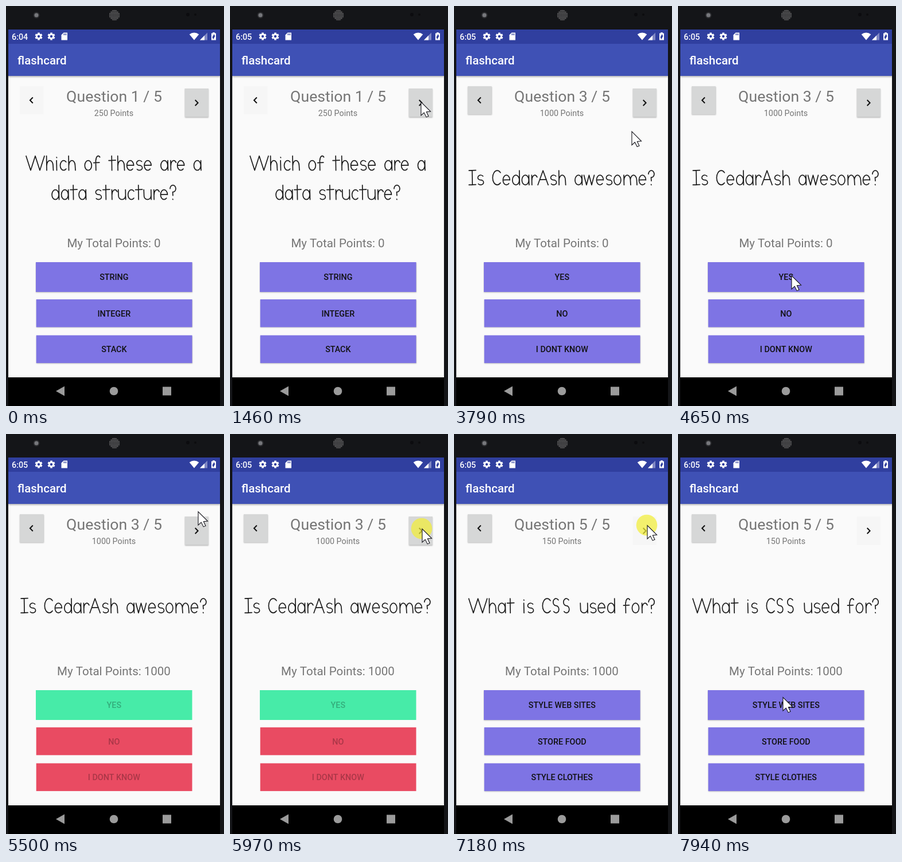
An HTML page with a canvas that plays this animation: 380x698 px, repeating every 8 s.

```html
<!DOCTYPE html>
<html lang="en">
<head>
<meta charset="utf-8">
<title>flashcard</title>
<style>
html, body { margin: 0; width: 100%; height: 100%; overflow: hidden; background: #141518; }
canvas { display: block; width: 380px; height: 698px; }
</style>
</head>
<body>
<canvas id="stage" role="img"></canvas>
<script>
const W = 380, H = 698, LOOP = 8000, MID = 188;
const canvas = document.getElementById('stage');
const c = canvas.getContext('2d');
const scale = Math.max(1, window.devicePixelRatio || 1);
canvas.width = W * scale;
canvas.height = H * scale;

const VIOLET = '#7e74e4', GREEN = '#47eba8', RED = '#e94b62';
const GREY = '#d6d7d7', PALE = '#f6f6f6', MUTED = '#757575', NAVY = '#303f9f';

// Mouse button down and up; the app reacts a moment after each release.
const presses = [[1310, 1460], [2470, 2630], [4570, 4650], [5970, 6050], [6380, 6460], [6910, 7000], [7180, 7240]];
const RIPPLE = 70, REACT = 150, SETTLE = 310, CLOCK_AT = 990;
const release = i => presses[i][1];
const answerAt = release(2) + REACT;

const cards = [
  { points: 250, lines: ['Which of these are a', 'data structure?'],
    answers: ['STRING', 'INTEGER', 'STACK'] },
  { press: 0, points: 100, lines: ['What is the main', 'language to build', 'Android applications?'],
    answers: ['JAVA', 'JAVASCRIPT', 'KOTLIN'] },
  { press: 1, points: 1000, lines: ['Is CedarAsh awesome?'],
    answers: ['YES', 'NO', 'I DONT KNOW'] },
  { press: 3, points: 500, lines: ['What is the main lan-', 'guage to build modern', 'web applications?'],
    answers: ['JAVA', 'JAVASCRIPT', 'PHP'] },
  { press: 4, points: 150, lines: ['What is CSS used for?'],
    answers: ['STYLE WEB SITES', 'STORE FOOD', 'STYLE CLOTHES'] }
];
const flipAt = card => 'press' in card ? release(card.press) + REACT : 0;

// Handwriting: every letter is built from a few pen strokes above the baseline.
const X = 17, T = 25;
const stem = (x, top = X, foot = 0) => p => { p.moveTo(x - .4, -top); p.lineTo(x, -foot); };
const bar = (y, from, to) => p => { p.moveTo(from, -y); p.lineTo(to, -y - .6); };
const dot = (x, y) => stem(x, y + .8, y);
const arc = (x, y, rx, ry, from, to, back = false) => p => {
  const a = from * Math.PI, b = to * Math.PI;
  p.moveTo(x + rx * Math.cos(a), -y + ry * Math.sin(a));
  p.ellipse(x, -y, rx, ry, 0, a, b, back);
};
const open = (h, w, from) => arc(w / 2 + 2, h / 2, w / 2, h / 2, from, .25, true);
const arch = x => p => {
  arc(x + 5.5, X / 2, 5.5, X / 2, 1, 2)(p);
  p.lineTo(x + 11.5, 0);
};
const snake = h => p => {
  arc(7.5, h * .75, 5, h / 4, 1.8, .5, true)(p);
  arc(7.5, h * .25, 5, h / 4, 1.5, .8)(p);
};
const zigzag = (h, w, n, low = 0) => p => {
  for (let i = 0; i <= n; i++) p.lineTo(1 + w * i / n, (i + low) % 2 ? 0 : -h);
};
const oval = arc(8, X / 2, 6, X / 2, 0, 2);

const letters = {
  a: [oval, stem(14.5)],
  b: [stem(2.5, T), oval],
  c: [open(X, 12, 1.75)],
  d: [oval, stem(14.5, T)],
  e: [open(X, 12, 0), bar(X / 2, 2, 14)],
  f: [arc(9, 18, 4, 7, 1, 1.75), stem(5, 18), bar(13, 1, 11)],
  g: [oval, stem(14), arc(8, 0, 6, 9, 0, .75)],
  h: [stem(3, T), arch(3)],
  i: [stem(4), dot(4, 22)],
  l: [stem(4, T)],
  m: [stem(3), arch(3), arch(14)],
  n: [stem(3), arch(3)],
  o: [oval],
  p: [stem(2.5, X, -9), oval],
  r: [stem(3), arc(8, X / 2, 5, X / 2, 1, 1.8)],
  s: [snake(X)],
  t: [stem(6.5, T), bar(X, 1, 13)],
  u: [stem(2, X, 6), arc(8, 6, 6, 6, 1, 0, true), stem(14.5)],
  w: [zigzag(X, 18, 4)],
  W: [zigzag(T, 32, 4)],
  A: [zigzag(T, 18, 2, 1), bar(9, 5, 16)],
  I: [stem(7, T), bar(T, 1, 13), bar(0, 1, 13)],
  C: [open(T, 16, 1.75)],
  S: [snake(T)],
  '?': [arc(7, 19, 5, 6, 1, .5), stem(7, 13, 7), dot(7, 0)],
  '-': [bar(8, 2, 11)],
  ' ': []
};
const advances = { il: 8, 'r ': 12.3, 'cstf?-I': 14, CS: 18, Aw: 21, m: 27, W: 34 };

const pen = {};
for (const ch in letters) {
  const path = new Path2D();
  letters[ch].forEach(stroke => stroke(path));
  const group = Object.keys(advances).find(set => set.includes(ch));
  pen[ch] = { path, advance: advances[group] || 16.5 };
}

function handwrite(line, y) {
  const width = [...line].reduce((sum, ch) => sum + pen[ch].advance, 0);
  c.save();
  c.translate(MID - width / 2, y);
  c.strokeStyle = '#1c1c1c';
  c.lineWidth = 1.7;
  c.lineCap = c.lineJoin = 'round';
  for (const ch of line) {
    c.stroke(pen[ch].path);
    c.translate(pen[ch].advance, 0);
  }
  c.restore();
}

function box(x, y, w, h, color) {
  c.fillStyle = color;
  c.fillRect(x, y, w, h);
}

function disc(x, y, r, color) {
  c.fillStyle = color;
  c.beginPath();
  c.arc(x, y, r, 0, Math.PI * 2);
  c.fill();
}

function shape(points, color, outline) {
  c.beginPath();
  points.forEach(([x, y]) => c.lineTo(x, y));
  c.closePath();
  c.fillStyle = color;
  c.fill();
  if (outline) {
    c.strokeStyle = outline;
    c.lineWidth = 1.1;
    c.stroke();
  }
}

function text(str, x, y, size, color, weight = 400, align = 'center') {
  c.font = `${weight} ${size}px Roboto, sans-serif`;
  c.textAlign = align;
  c.fillStyle = color;
  c.fillText(str, x, y);
}

function raised(x, y, w, h, color, lift) {
  c.save();
  if (lift) {
    c.shadowColor = 'rgba(0,0,0,.26)';
    c.shadowBlur = (lift + 1) * scale;
    c.shadowOffsetY = lift * scale;
  }
  box(x, y, w, h, color);
  c.restore();
}

function gear(x, y) {
  c.save();
  c.translate(x, y);
  for (let i = 0; i < 6; i++) {
    c.rotate(Math.PI / 3);
    box(-1.8, -6.5, 3.6, 4, '#fff');
  }
  disc(0, 0, 4.9, '#fff');
  disc(0, 0, 2.2, NAVY);
  c.restore();
}

function phone() {
  box(0, 0, W, H, '#141518');
  disc(53, 16, 5.5, '#2c2d30');
  disc(53, 16, 3.5, '#77787c');
  disc(189, 16, 9.5, '#29292b');
  for (let i = -3; i <= 3; i++) {
    for (let j = -3; j <= 3; j++) {
      if (i * i + j * j < 11) disc(189 + i * 2.6, 16 + j * 2.6, .85, '#77777a');
    }
  }
  disc(317, 15, 3, '#0c0c0f');
  disc(330, 15, 2, '#0c0c0f');
}

function statusBar(t) {
  box(4, 41, 369, 25, NAVY);
  text(t < CLOCK_AT ? '6:04' : '6:05', 10, 58.5, 14.35, '#fff', 500, 'left');
  gear(57, 53);
  gear(79, 53);
  shape([[100.5, 46.5], [107, 46.5], [107, 59.5], [96.5, 59.5], [96.5, 50.5]], '#fff');
  for (let i = 0; i < 3; i++) box(100.4 + i * 2, 48, 1, 3, NAVY);

  c.fillStyle = '#fff';
  c.beginPath();
  c.moveTo(328, 59.5);
  c.arc(328, 59.5, 13, -Math.PI * .72, -Math.PI * .28);
  c.fill();

  const wedge = (size, color) => shape([[338, 59.5], [338 + size, 59.5 - size], [338 + size, 59.5]], color);
  wedge(13, '#8088c4');
  wedge(8, '#fff');
  box(358, 47.5, 8, 12, '#fff');
  box(360.3, 46, 3.4, 2, '#fff');
  shape([[362.8, 49], [359.6, 54.3], [361.2, 58.2], [364.4, 52.8]], NAVY);
}

function navBar() {
  box(4, 648, 369, H - 648, '#000');
  shape([[87, 672], [102, 663.5], [102, 680.5]], '#9b9b9b');
  disc(188, 672, 7.3, '#9b9b9b');
  box(273, 664.5, 15, 15, '#9b9b9b');
}

function chevron(x, y, dir) {
  c.strokeStyle = '#111';
  c.lineWidth = 2;
  c.beginPath();
  c.moveTo(x - 2.3 * dir, y - 5);
  c.lineTo(x + 2.6 * dir, y);
  c.lineTo(x - 2.3 * dir, y + 5);
  c.stroke();
}

function arrows(t, index) {
  raised(24, 140, 41.5, 49, index ? GREY : PALE, index ? 1 : 0);
  chevron(44.5, 164.5, -1);

  const last = index === cards.length - 1;
  const age = t - Math.max(...cards.slice(1).map(card => release(card.press)).filter(up => up <= t));
  const rippling = !last && age >= RIPPLE && age < SETTLE;
  raised(311.5, 144, 41.5, 49.5, last ? PALE : GREY, last ? 0 : rippling ? 2 : 1);
  if (rippling) {
    c.save();
    c.beginPath();
    c.rect(311.5, 144, 41.5, 49.5);
    c.clip();
    if (age < REACT) disc(331.5, 164, 19.5, '#bbbdbc');
    else box(311, 144, 43, 50, '#c6c8c7');
    c.restore();
  }
  chevron(332, 169, 1);
}

function quiz(t) {
  const index = cards.findLastIndex(card => t >= flipAt(card));
  const card = cards[index];
  const answered = t >= answerAt;
  const solved = answered && index === 2;
  canvas.setAttribute('aria-label', card.lines.join(' '));

  box(4, 122, 369, 526, '#fafafa');
  raised(4, 66, 369, 56, '#3f51b5', 1.5);
  text('flashcard', 20, 102, 20.5, '#fff', 500, 'left');
  arrows(t, index);
  text(`Question ${index + 1} / 5`, 188.5, 166.5, 26.65, MUTED);
  text(`${card.points} Points`, MID, 192, 14.35, MUTED);

  const top = 312.2 - (card.lines.length - 1) * 25.5;
  card.lines.forEach((line, i) => handwrite(line, top + i * 51));

  text(`My Total Points: ${answered ? 1000 : 0}`, MID, 420.5, 20.5, MUTED);
  card.answers.forEach((answer, i) => {
    const x = i ? 52.7 : 52, y = i ? 449.2 + i * 62.7 : 447, h = i ? 48.5 : 52;
    raised(x, y, 324.5 - x, h, !solved ? VIOLET : i ? RED : GREEN, solved ? 0 : 1);
    text(answer, 188.3, y + h / 2 + 5.4, 14.35, solved ? 'rgba(0,0,0,.27)' : '#111', 500);
  });
}

// Pointer travel: start and end time, then the place reached.
const STEP = 77;
const moves = [
  [150, 990, 332, 167],
  [3790, 4340, 197, 470],
  [5110, 5500, 334, 135],
  [5580, 5880, 334, 165],
  [6380, 6380, 336, 159],
  [7640, 7940, 182, 459]
];

function pointerAt(t) {
  let x = 261, y = 740;
  for (const [start, end, toX, toY] of moves) {
    if (t < start) break;
    const count = Math.round((end - start) / STEP) + 1;
    const step = Math.floor((t - start) / (end - start + STEP) * count + .05) + 1;
    const k = 1 - Math.pow(1 - Math.min(1, step / count), 1.4);
    x += (toX - x) * k;
    y += (toY - y) * k;
  }
  return [x, y];
}

function pointer(t) {
  if (t < moves[0][0]) return;
  const [x, y] = pointerAt(t);
  if (presses.some(([down, up]) => t >= down && t < up)) disc(x, y, 18.3, 'rgba(242,238,52,.7)');
  c.save();
  c.translate(x + 1, y + .5);
  shape([[0, 0], [0, 23.5], [5.3, 18.6], [9.2, 26.4], [13, 24.8], [9.4, 17.2], [16.6, 16.6]], '#fff', '#15151c');
  c.restore();
}

function draw(t) {
  c.setTransform(scale, 0, 0, scale, 0, 0);
  phone();
  quiz(t);
  statusBar(t);
  navBar();
  pointer(t);
}

const begin = performance.now();
function tick() {
  draw((performance.now() - begin) % LOOP);
  requestAnimationFrame(tick);
}
tick();
</script>
</body>
</html>
```
